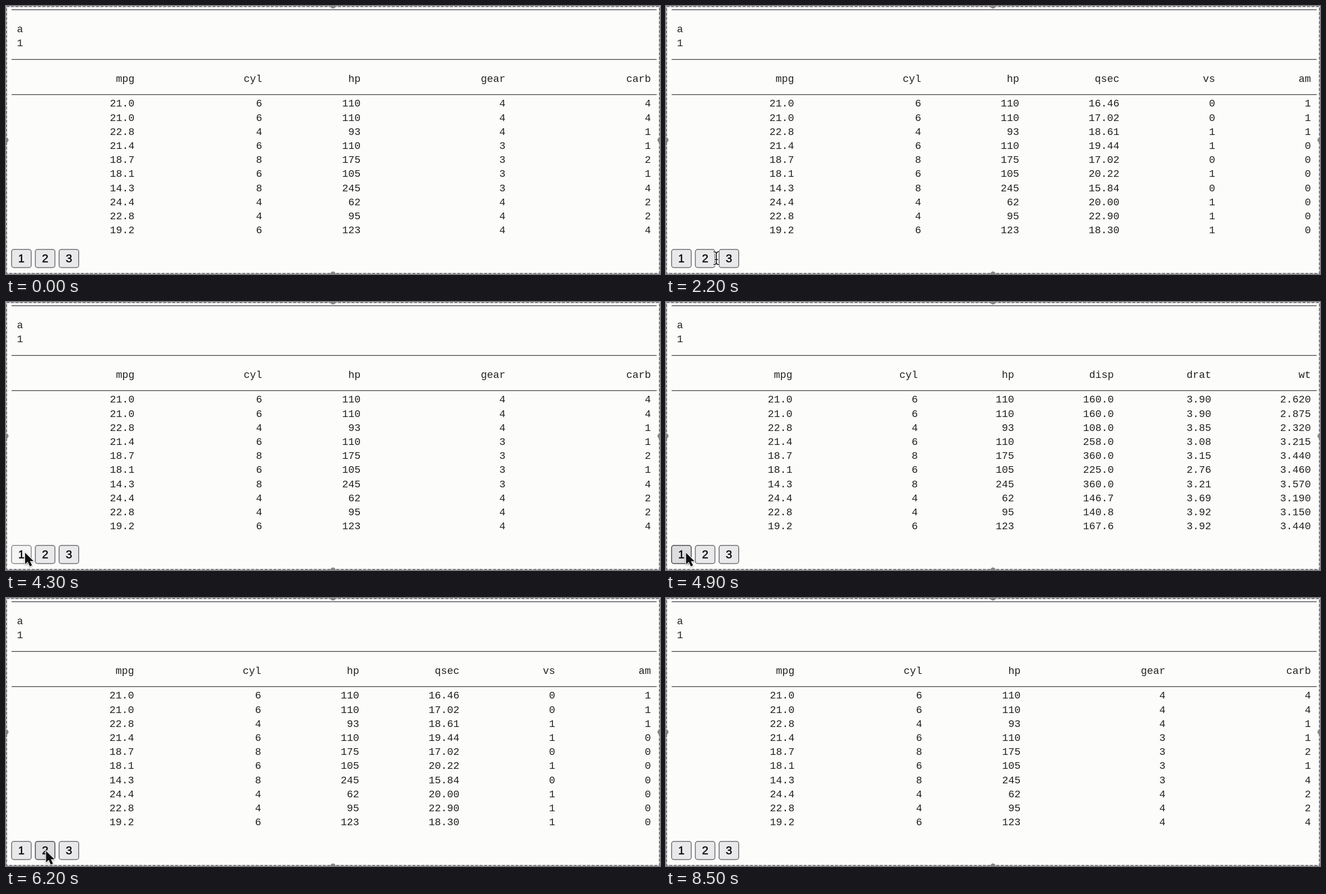
An HTML page with a canvas that plays this animation: 1168 by 480 pixels, repeating every 8700 ms.

```html
<!DOCTYPE html>
<html lang="en">
<head>
<meta charset="utf-8">
<title>Paged table</title>
<style>
  html, body { margin: 0; width: 100%; height: 100%; overflow: hidden; background: #fcfcfa; }
  canvas { display: block; }
</style>
</head>
<body>
<canvas id="stage" width="1168" height="480"></canvas>
<script>
const ctx = document.getElementById('stage').getContext('2d');
const LOOP = 8700, STEP = 100;
const LEFT = 10, WIDTH = 1152, PADDING = 10.2;
const MONO = '18.33px "Liberation Mono", "Courier New", monospace';
const SANS = '20.4px "Liberation Sans", Arial, sans-serif';

// Each column takes an equal share of the free width plus its own extra
const column = (name, extra, cells) => ({ name, extra, cells });
const words = str => str.split(' ');
const shared = [
  column('mpg', 54, words('21.0 21.0 22.8 21.4 18.7 18.1 14.3 24.4 22.8 19.2')),
  column('cyl', 52, [...'6646868446']),
  column('hp', 0, words('110 110 93 110 175 105 245 62 95 123'))
];
const pages = {
  1: [...shared,
    column('disp', 6, words('160.0 160.0 108.0 258.0 360.0 225.0 360.0 146.7 140.8 167.6')),
    column('drat', 2, words('3.90 3.90 3.85 3.08 3.15 2.76 3.21 3.69 3.92 3.92')),
    column('wt', 6, words('2.620 2.875 2.320 3.215 3.440 3.460 3.570 3.190 3.150 3.440'))],
  2: [...shared,
    column('qsec', 4, words('16.46 17.02 18.61 19.44 17.02 20.22 15.84 20.00 22.90 18.30')),
    column('vs', -4, [...'0011010111'.replace('0011', '0011')]),
    column('am', -4, [...'1110000000'])],
  3: [...shared,
    column('gear', 83, [...'4443333444']),
    column('carb', 84, [...'4411214224'])]
};

const buttons = [1, 2, 3].map(page => ({ page, x: 10 + (page - 1) * 42.4, y: 436, w: 35, h: 32.5 }));

// The pointer rests at each stop; a stop with a page is a click released at that time
const stops = [
  { time: 100, x: 140, y: 495 },
  { time: 1500, x: 73, y: 450, page: 2 },
  { time: 2800, x: 116, y: 453, page: 3 },
  { time: 4400, x: 34, y: 449, page: 1 },
  { time: 5700, x: 66, y: 453, page: 2 },
  { time: 6800, x: 118, y: 454, page: 3 },
  { time: 8000, x: 140, y: 495 }
];
const LEAVE = 400, ARRIVE = 200, PRESS = 200;

function pointerAt(t) {
  const i = stops.findIndex(stop => stop.time > t);
  if (i < 1) return stops[0];
  const a = stops[i - 1], b = stops[i];
  const start = a.time + LEAVE, end = b.time - ARRIVE;
  const u = Math.min(1, Math.max(0, (t - start) / (end - start)));
  const e = u * u * (3 - 2 * u);
  return { x: a.x + (b.x - a.x) * e, y: a.y + (b.y - a.y) * e };
}

function text(str, x, y, align = 'left', font = MONO, color = '#222') {
  ctx.font = font;
  ctx.textAlign = align;
  ctx.fillStyle = color;
  ctx.fillText(str, x, y);
}

function drawFrame() {
  ctx.lineWidth = 2;
  ctx.strokeStyle = '#cfcfd3';
  ctx.strokeRect(1, 1, 1166, 478);
  ctx.strokeStyle = '#808084';
  ctx.setLineDash([5, 3]);
  ctx.strokeRect(1, 1, 1166, 478);
  ctx.setLineDash([]);
  ctx.fillStyle = '#858585';
  for (const [x, y] of [[584, 0], [584, 480], [0, 240], [1168, 240]]) {
    ctx.beginPath();
    ctx.arc(x, y, 4.5, 0, 7);
    ctx.fill();
  }
}

function drawTable(columns) {
  ctx.fillStyle = '#404046';
  for (const y of [6, 95, 158]) ctx.fillRect(LEFT, y, WIDTH, 1.3);
  text('a', 19.5, 47);
  text('1', 19.5, 72);
  const share = (WIDTH - columns.reduce((sum, c) => sum + c.extra, 0)) / columns.length;
  let right = LEFT - PADDING;
  for (const { name, extra, cells } of columns) {
    right += share + extra;
    text(name, right, 135.8, 'right');
    cells.forEach((cell, row) => text(cell, right, 180.3 + row * 25.22, 'right'));
  }
}

function drawButton({ page, x, y, w, h }, hover, active) {
  ctx.beginPath();
  ctx.roundRect(x, y, w, h, 4);
  ctx.fillStyle = active ? '#f5f5f5' : hover ? '#dddde0' : '#e9e9eb';
  ctx.strokeStyle = active ? '#858585' : hover ? '#45454a' : '#6c6c6c';
  ctx.lineWidth = 1.5;
  ctx.fill();
  ctx.stroke();
  text(page, x + w / 2, 459.3, 'center', SANS, '#000');
  ctx.lineWidth = 0.4;
  ctx.strokeStyle = '#000';
  ctx.strokeText(page, x + w / 2, 459.3);
}

function drawArrow() {
  const shape = new Path2D('M0 0V22.5L5.2 17.6L9.4 26.5L13.6 24.6L9.6 16.2H16.5Z');
  ctx.scale(0.92, 0.92);
  ctx.lineJoin = 'round';
  ctx.lineWidth = 2.4;
  ctx.strokeStyle = '#fff';
  ctx.shadowColor = 'rgba(0,0,0,.35)';
  ctx.shadowBlur = 3;
  ctx.shadowOffsetY = 1;
  ctx.stroke(shape);
  ctx.shadowColor = 'transparent';
  ctx.fillStyle = '#111';
  ctx.fill(shape);
}

function drawBeam() {
  const shape = new Path2D('M-5-11Q0-11 0-7Q0-11 5-11M0-7V8M-3 3H3M-5 12Q0 12 0 8Q0 12 5 12');
  for (const [width, color] of [[4, '#fff'], [1.7, '#222']]) {
    ctx.lineWidth = width;
    ctx.strokeStyle = color;
    ctx.stroke(shape);
  }
}

function draw(t) {
  const clicks = stops.filter(stop => stop.page);
  const page = clicks.reduce((shown, c) => t >= c.time ? c.page : shown, 3);
  const press = clicks.find(c => t >= c.time - PRESS && t < c.time && t >= c.time - STEP);
  const pointer = pointerAt(t);
  const inRow = pointer.y > 436 && pointer.y < 469;
  const hovered = inRow && buttons.find(b => pointer.x >= b.x && pointer.x <= b.x + b.w);
  const inGap = inRow && !hovered && pointer.x < 130;

  ctx.fillStyle = '#fcfcfa';
  ctx.fillRect(0, 0, 1168, 480);
  drawFrame();
  drawTable(pages[page]);
  buttons.forEach(b => drawButton(b, b === hovered, press && press.page === b.page));

  ctx.save();
  ctx.translate(pointer.x, pointer.y);
  inGap ? drawBeam() : drawArrow();
  ctx.restore();
}

function tick() {
  draw(Math.floor(performance.now() % LOOP / STEP) * STEP);
  requestAnimationFrame(tick);
}
tick();
</script>
</body>
</html>
```
